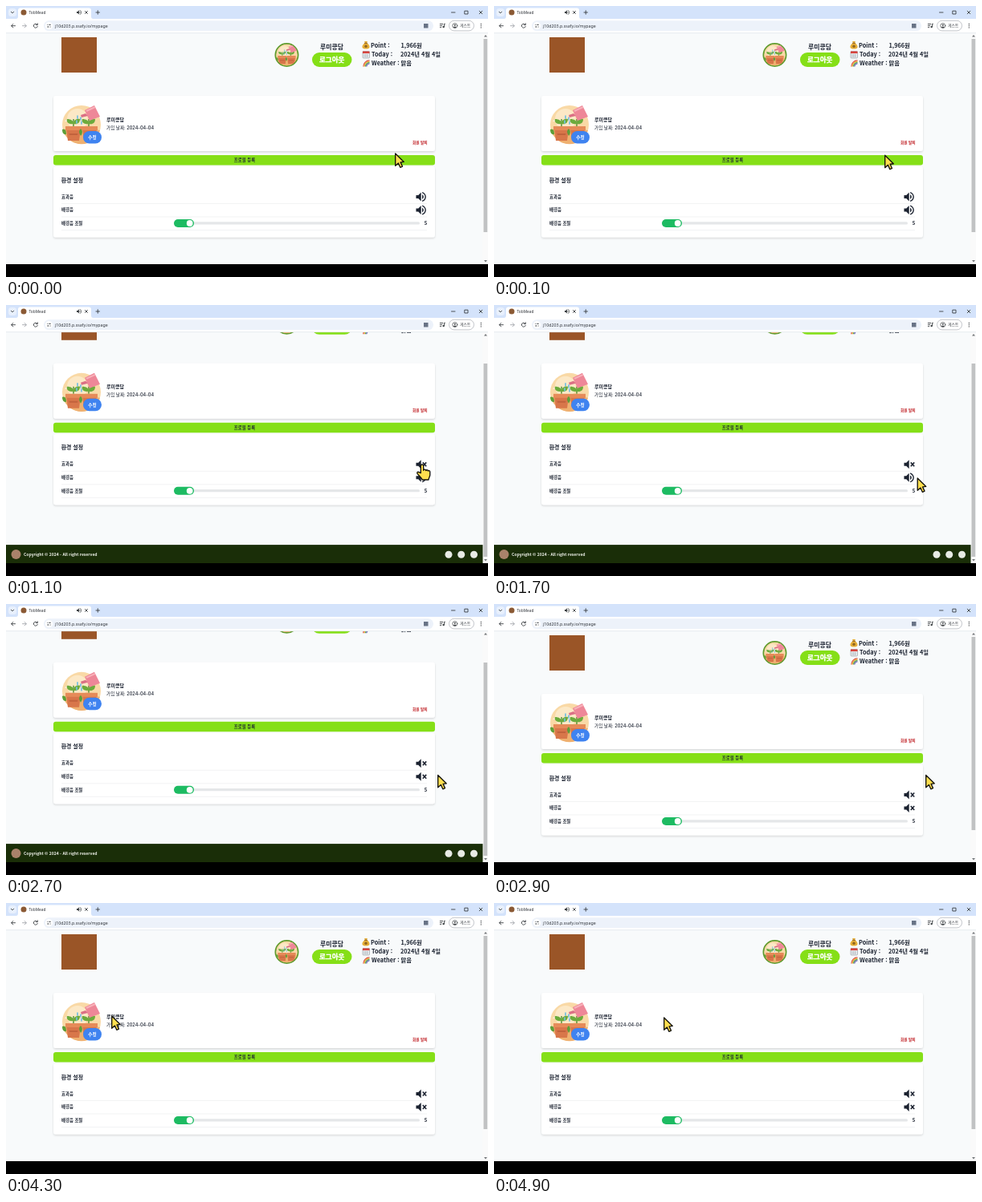
Recreate the animation shown at these times as an HTML page. Size 600 by 338 pixels, loop 5 s.

```html
<!DOCTYPE html>
<html lang="ko">
<head>
<meta charset="utf-8">
<title>My page</title>
<style>
html, body { margin: 0; width: 100%; height: 100%; overflow: hidden; background: #000; }
svg { display: block; width: 100vw; height: 100vh; }
text { font-family: "Noto Sans CJK KR", "Noto Sans CJK", sans-serif; font-weight: 700; fill: #1b2230; white-space: pre; }
.ui { font-family: "Noto Sans", "Noto Sans CJK KR", sans-serif; font-weight: 400; fill: #30343a; }
.line { fill: none; stroke: #3c4043; stroke-width: .9; stroke-linecap: round; stroke-linejoin: round; }
.mid { text-anchor: middle; }
.cursor { fill: #ffdf4f; stroke: #14130c; stroke-width: 1.35; stroke-linejoin: round; }
</style>
</head>
<body>
<svg viewBox="0 0 600 338" preserveAspectRatio="none">
  <defs>
    <clipPath id="view"><rect y="34" width="594" height="288"/></clipPath>
    <clipPath id="disc"><circle r="24"/></clipPath>
    <filter id="soft" x="-5%" y="-10%" width="110%" height="125%">
      <feDropShadow dx="0" dy="1.3" stdDeviation="1.3" flood-color="#000" flood-opacity=".15"/>
    </filter>
    <g id="pot">
      <path d="M-9 0H9L7 15H-7Z" fill="#d8764a"/>
      <path d="M-10 -3H10V2H-10Z" fill="#e68b59"/>
      <path d="M-5.5 6H5.5L5 8H-5Z" fill="#c2623d"/>
    </g>
    <g id="plant">
      <path d="M0 0V-9" stroke="#4f8f2f" stroke-width="1.4"/>
      <path d="M0 -3C-8 -2 -9 -7 -8 -9C-3 -9 0 -7 0 -3C0 -8 4 -10 8 -9C8 -4 5 -2 0 -3Z" fill="#6cab3c"/>
    </g>
    <g id="garden">
      <circle r="24" fill="#f9d9a6"/>
      <circle cx="-5" cy="-7" r="13" fill="#fce8c6"/>
      <path d="M-23 7Q0 3 23 7A24 24 0 0 1 -23 7Z" fill="#efb070"/>
      <path d="M-20 -5q3-4 6 0q3-3 6 1h-13Z" fill="#fff3e2"/>
      <use href="#plant" x="-10" y="2"/>
      <use href="#plant" x="9" y="2"/>
      <path d="M-5 -11v3M-1 -9v3M-6 -5v3M0 -4v3" stroke="#74bfe0" stroke-width="1.7" stroke-linecap="round"/>
      <use href="#pot" x="-10" y="5"/>
      <use href="#pot" x="10" y="5"/>
      <path d="M-24 6q5-2 5 6q-5 1-5-6M-1 14q-4-6 0-9q4 4 0 9" fill="#5d9e38"/>
      <path d="M4 -18L16 -24L23 -10L10 -5Z" fill="#ee8798"/>
      <path d="M8 -11L0 -9L-1 -12L5 -14Z" fill="#db6f85"/>
      <path d="M6 -17L17 -22" stroke="#f8b2ba" stroke-width="2"/>
    </g>
    <path id="horn" d="M3 9v6h4l5 5V4L7 9Z"/>
    <g id="loud">
      <use href="#horn"/>
      <path d="M16.5 12c0-1.8-1-3.3-2.5-4v8c1.5-.7 2.5-2.2 2.5-4ZM14 3.2v2.1c2.9.9 5 3.5 5 6.7s-2.1 5.8-5 6.7v2.1c4-.9 7-4.5 7-8.8s-3-7.900-7-8.800Z"/>
    </g>
    <g id="mute">
      <use href="#horn"/>
      <path d="M15 8.500L21.500 15.500M21.500 8.500L15 15.500" stroke="#1b2230" stroke-width="2.200"/>
    </g>
  </defs>

  <rect width="600" height="338" fill="#f8fafb"/>

  <g clip-path="url(#view)">
    <g id="page">
      <rect x="69" y="39" width="44" height="44" fill="#9a5527"/>

      <g transform="translate(349.500 61)">
        <circle r="15" fill="#5f9b2d"/>
        <g transform="scale(.56)" clip-path="url(#disc)"><use href="#garden"/></g>
      </g>
      <text class="mid" x="405.500" y="53.500" font-size="7.900">루미콩담</text>
      <rect x="381" y="58" width="49.500" height="18" rx="9" fill="#85df17"/>
      <text class="mid" x="405.700" y="70" font-size="8.500" style="fill:#fff;stroke:#fff;stroke-width:.35">로그아웃</text>

      <path d="M446 44h4l-1 2q4 2.500 3.500 5.500q-.5 2-4.500 2t-4.500-2q-.5-3 3.500-5.500Z" fill="#e5ae38"/>
      <path d="M446 46.300h4" stroke="#8a5a20"/>
      <circle cx="448" cy="50.200" r="1.700" fill="#8f641f"/>
      <rect x="444" y="56.500" width="8.500" height="8.500" rx="1" fill="#e9edf0" stroke="#8d969d" stroke-width=".6"/>
      <path d="M444 56.500h8.500v2.600h-8.500Z" fill="#d6433d"/>
      <path d="M445.500 61h5.500M445.500 63h5.500" stroke="#77838d" stroke-width=".8" stroke-dasharray="1 .7"/>
      <g id="bow" fill="none" stroke-width="1.300"/>
      <g font-size="7.300" font-weight="500">
        <text x="454" y="51.700">Point :</text><text x="491.500" y="51.700">1,966원</text>
        <text x="455" y="62.700">Today :</text><text x="491" y="62.700">2024년 4월 4일</text>
        <text x="455" y="73.700">Weather :</text><text x="491.500" y="73.700">맑음</text>
      </g>

      <rect x="59" y="112" width="475" height="69" rx="3" fill="#fff" filter="url(#soft)"/>
      <use href="#garden" x="94" y="148"/>
      <rect x="96" y="156" width="23" height="15.500" rx="7.700" fill="#3f83f0"/>
      <text class="mid" x="107.500" y="166" font-size="5.600" style="fill:#fff">수정</text>
      <text x="125" y="143.700" font-size="6">루미콩담</text>
      <text x="125" y="153.700" font-size="5.600" style="font-family:Inter,'Noto Sans CJK KR',sans-serif;font-weight:500">가입 날짜: 2024-04-04</text>
      <text x="506" y="172.200" font-size="4.700" style="fill:#bf1d22">회원 탈퇴</text>

      <rect x="59" y="200" width="475" height="88.500" rx="3" fill="#fff" filter="url(#soft)"/>
      <rect x="59" y="186" width="475" height="12.500" rx="3" fill="#85df17"/>
      <text class="mid" x="297" y="194.200" font-size="5.400">프로필 등록</text>
      <text x="68.700" y="219.700" font-size="6.900">환경 설정</text>
      <g font-size="5.400">
        <text x="69" y="239.600">효과음</text>
        <text x="69" y="256.200">배경음</text>
        <text x="69" y="272.900">배경음 조절</text>
      </g>
      <path d="M69 246.500H524M69 263H524M69 279.500H524" stroke="#eceef0" stroke-width=".7"/>
      <g id="icons" fill="#1b2230">
        <use transform="translate(508.400 229.700) scale(.69)"/>
        <use transform="translate(508.400 246.200) scale(.69)"/>
      </g>
      <rect x="209" y="269.300" width="306" height="3.200" rx="1.600" fill="#e5e7e9"/>
      <rect x="209" y="266" width="25" height="10" rx="5" fill="#1dbb62"/>
      <circle cx="228.700" cy="271" r="3.900" fill="#fff"/>
      <text x="520.800" y="273" font-size="6" font-weight="500">5</text>

      <rect y="338.300" width="594" height="24" fill="#1a2e08"/>
      <circle cx="12.500" cy="350.300" r="6" fill="#a9826a"/>
      <text x="22" y="352.200" font-size="5.050" style="fill:#f3f5ee">Copyright © 2024 - All right reserved</text>
      <g fill="#e8ebe5">
        <circle cx="551" cy="350.500" r="4.500"/><circle cx="566.700" cy="350.500" r="4.500"/><circle cx="582.500" cy="350.500" r="4.500"/>
      </g>
    </g>
  </g>

  <rect x="593.500" y="34" width="6.500" height="288" fill="#fafafa"/>
  <rect id="thumb" x="594.500" y="41" width="4.700" height="241" fill="#c1c2c3"/>
  <path d="M595 38.500h4l-2-2.500ZM595 317h4l-2 2.500Z" fill="#75787b"/>
  <rect y="322" width="600" height="16" fill="#000"/>

  <rect width="600" height="17" fill="#d4e3fb"/>
  <rect y="16" width="600" height="17.500" fill="#fff"/>
  <path d="M0 33.700H600" stroke="#e0e4e8" stroke-width=".7"/>
  <rect x="3" y="3" width="10" height="10" rx="3.500" fill="#e8f0fd"/>
  <path class="line" d="M6.300 7.200L8 8.900L9.700 7.200"/>
  <path d="M12.500 16Q15 16 15 13V5.500Q15 2.500 18 2.500H103Q106 2.500 106 5.500V13Q106 16 108.500 16Z" fill="#fff"/>
  <circle cx="22" cy="8" r="3.500" fill="#8b5a35"/>
  <text class="ui" x="28.500" y="10" font-size="4.800">TobMead</text>
  <use href="#loud" transform="translate(87 4) scale(.33)" fill="#3c4043"/>
  <path class="line" d="M98.500 6.500l3 3m0-3l-3 3M112 8h4.500M114.250 5.750v4.500M554.500 8h4.500M589.200 6.200l3.600 3.600m0-3.600l-3.600 3.600M571.200 6.200h3.800v3.800h-3.800Z"/>

  <path class="line" d="M11.500 24.700H6.700M8.900 22.500L6.700 24.700L8.900 26.900M39 23.300A2.500 2.500 0 1 0 39.300 25.500M39.300 21.800V23.600H37.500"/>
  <path class="line" style="stroke:#a4a8ad" d="M20.500 24.700H25.300M23.100 22.500L25.300 24.700L23.100 26.900"/>
  <rect x="47" y="18.300" width="485" height="12.700" rx="6.300" fill="#edf2fa"/>
  <circle cx="53.500" cy="24.700" r="4.600" fill="#fff"/>
  <path class="line" d="M51.700 23.400h.1M53.600 23.400h1.800M51.500 26h1.800M55.300 26h.1"/>
  <text class="ui" x="61" y="26.700" font-size="5.250">j10d203.p.ssafy.io/mypage</text>
  <rect x="520" y="22" width="5.500" height="5.500" fill="#687386"/>
  <path class="line" d="M540.300 22.500h3.500M540.300 24.600h2.500M540.300 26.700h1.500M545.500 26V22.300h1"/>
  <circle cx="544.600" cy="26.200" r="1.100" fill="#3c4043"/>
  <rect x="551.500" y="18.300" width="31" height="12.600" rx="6.300" fill="#fff" stroke="#a9adb3" stroke-width=".7"/>
  <circle class="line" cx="558.800" cy="24.600" r="3" style="stroke-width:.7"/>
  <circle cx="558.800" cy="23.700" r="1" fill="#3c4043"/>
  <path d="M556.900 26.500q1.900-1.800 3.800 0q-1.900 1.600-3.800 0" fill="#3c4043"/>
  <text class="ui" x="565.300" y="26.400" font-size="4.700">게스트</text>
  <path class="line" d="M591.300 22.500v0M591.300 24.700v0M591.300 26.900v0" style="stroke-width:1.300"/>

  <path id="arrow" class="cursor" d="M.7 1V16.300L4.400 12.900L6.800 18.300L9.500 17.100L7.100 11.900L11.300 11.400Z"/>
  <path id="hand" class="cursor" d="M-1.700 10.500V1.700a1.700 1.700 0 0 1 3.400 0V7.200c0-1.600 3-1.400 3 .3c.3-1.200 2.700-.9 2.700.6c.4-1 2.400-.7 2.400.9V13c0 2-1.600 3.400-1.800 6H.2C-.4 16.600-4.500 13.500-6 11.200c-.9-1.600 1-2.600 2.200-1.500Z"/>
</svg>
<script>
const $ = id => document.getElementById(id);
const LOOP = 5000, STEP = 100;

// time, x, y
const path = [
  [0, 484, 183], [300, 490, 190], [600, 503, 204], [900, 518, 199], [1200, 518, 199],
  [1500, 544, 228], [1600, 544, 228], [1700, 526.5, 215], [1900, 520, 211], [2300, 520, 211],
  [2700, 537, 212.5], [2900, 537, 212.5], [3300, 400, 250], [3600, 230, 270.5],
  [3700, 228, 270.5], [3800, 227, 267], [3900, 222, 247], [4200, 150, 190],
  [4300, 131, 140], [4400, 175, 102], [4500, 231, 127], [4700, 196, 134], [4900, 211, 142]
];
const scrolls = [[0, 0], [200, 0], [400, 39.2], [2700, 39.2], [2900, 0]];
const presses = [[900, 1200], [1900, 2300], [3600, 3800]];
const muteAt = [1100, 2300];

function at(keys, t) {
  const i = keys.findIndex(k => k[0] > t);
  if (i < 0) return keys[keys.length - 1].slice(1);
  const a = keys[i - 1], b = keys[i];
  const p = (t - a[0]) / (b[0] - a[0]);
  return a.slice(1).map((v, n) => v + (b[n + 1] - v) * p);
}

function draw(t) {
  const [scroll] = at(scrolls, t);
  const [x, y] = at(path, t);
  const pressing = presses.some(([a, b]) => t >= a && t <= b);
  $("page").setAttribute("transform", `translate(0 ${-scroll})`);
  $("thumb").setAttribute("y", 41 + scroll * 32 / 39.2);
  [...$("icons").children].forEach((icon, i) =>
    icon.setAttribute("href", t >= muteAt[i] ? "#mute" : "#loud"));
  for (const id of ["arrow", "hand"]) {
    $(id).setAttribute("transform", `translate(${x} ${y})`);
    $(id).style.display = (id === "hand") === pressing ? "" : "none";
  }
}

$("bow").innerHTML = ["#d94a3f", "#efb03c", "#58a65a", "#6a62b5"].map((c, i) => {
  const r = 7.6 - i * 1.3;
  return `<path d="M${452.5 - r} 75.500A${r} ${r} 0 0 1 452.500 ${75.5 - r}" stroke="${c}"/>`;
}).join("");

function tick() {
  draw(Math.floor(performance.now() % LOOP / STEP) * STEP);
  requestAnimationFrame(tick);
}
tick();
</script>
</body>
</html>
```
